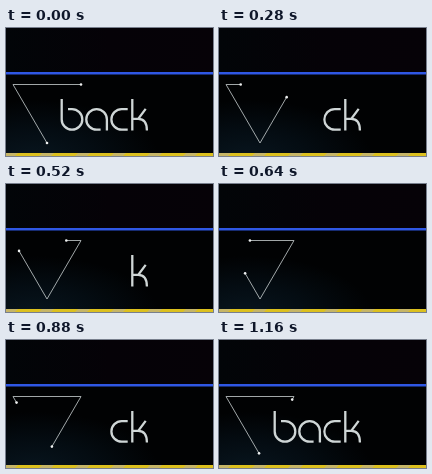
An HTML page for the animation above (1.18 s loop, 207 by 128 pixels).

```html
<!DOCTYPE html>
<html lang="en">
<head>
<meta charset="utf-8">
<title>back</title>
<style>
  html, body { margin: 0; height: 100%; overflow: hidden; background: #010203; }
  svg { display: block; width: 100vw; height: 100vh; }
  .letters { fill: none; stroke: #cfd6d6; stroke-width: 2.3; }
  #trail { fill: none; stroke: #b4babc; stroke-width: .9; stroke-linejoin: round; }
  circle { fill: #eef0f0; }
</style>
</head>
<body>
<svg viewBox="0 0 207 128">
  <defs>
    <linearGradient id="sky" x2="1">
      <stop stop-color="#020508"/>
      <stop offset=".5" stop-color="#050207"/>
      <stop offset="1" stop-color="#060207"/>
    </linearGradient>
    <radialGradient id="glow" gradientUnits="userSpaceOnUse" cx="0" cy="0" r="1"
      gradientTransform="translate(28 130) scale(125 58)">
      <stop stop-color="#08151e"/>
      <stop offset=".5" stop-color="#040c12"/>
      <stop offset="1" stop-color="#010203"/>
    </radialGradient>
    <pattern id="hazard" width="36" height="4" patternUnits="userSpaceOnUse" patternTransform="translate(32 125)">
      <path d="M0 0h36v4H0z" fill="#dcc01e"/>
      <path d="M4 0h12l-4 4H0z" fill="#c6b566"/>
    </pattern>
  </defs>
  <rect width="207" height="44" fill="url(#sky)"/>
  <rect y="46" width="207" height="79" fill="url(#glow)"/>
  <rect y="44" width="207" height="2.5" fill="#2f57e4"/>
  <rect y="125" width="207" height="3" fill="url(#hazard)"/>
  <g class="letters" role="img" aria-label="back" transform="translate(-.3 -.6)">
    <path d="M56 71.5V92a10.3 10.3 0 1 0 10.3-10.3h-4"/>
    <path d="M101.2 103V92a10.3 10.3 0 1 0-10.3 10.3h4"/>
    <path d="M122 81.7h-6a10.3 10.3 0 0 0 0 20.6h6"/>
    <path d="M126.6 71.5V103M126.6 91.5H132.5L140 81.5M132.5 91.5q8.7 0 8.7 11.5"/>
  </g>
  <path id="trail"/>
  <circle id="tail" r="1.3"/>
  <circle id="head" r="1.3"/>
</svg>
<script>
const LOOP = 1180, STEP = 40, LEG = 400;
const corners = [[75, 56.5], [7, 56.5], [41, 115]];
const hideAt = [140, 280, 420, 560];
const showAt = [1100, 960, 820, 700];
// start and end speeds of the tail on each side of the triangle
const tailSpeeds = [[0, 0], [0, .6], [.4, .35]];
const letters = document.querySelectorAll('.letters path');
const byId = id => document.getElementById(id);

const ease = (p, a = 0, b = 0) =>
  p * p * (3 - 2 * p) + a * p * (1 - p) ** 2 - b * p * p * (1 - p);

const corner = i => corners[i % 3];

function along(side, k) {
  const [x, y] = corner(side), [u, v] = corner(side + 1);
  return [x + (u - x) * k, y + (v - y) * k];
}

function place(dot, [x, y]) {
  dot.setAttribute('cx', x);
  dot.setAttribute('cy', y);
}

function draw(now) {
  const t = Math.floor(now % LOOP / STEP) * STEP;
  const side = Math.floor(t / LEG), p = t % LEG / LEG;
  const tail = along(side, ease(p, ...tailSpeeds[side]));
  const head = along(side + 2, ease(p));
  byId('trail').setAttribute('d',
    'M' + [tail, corner(side + 1), corner(side + 2), head].join('L'));
  place(byId('tail'), tail);
  place(byId('head'), head);
  letters.forEach((letter, i) => {
    letter.style.visibility = t >= hideAt[i] && t < showAt[i] ? 'hidden' : 'visible';
  });
}

const start = performance.now();
function tick() {
  draw(performance.now() - start);
  requestAnimationFrame(tick);
}
tick();
</script>
</body>
</html>
```
